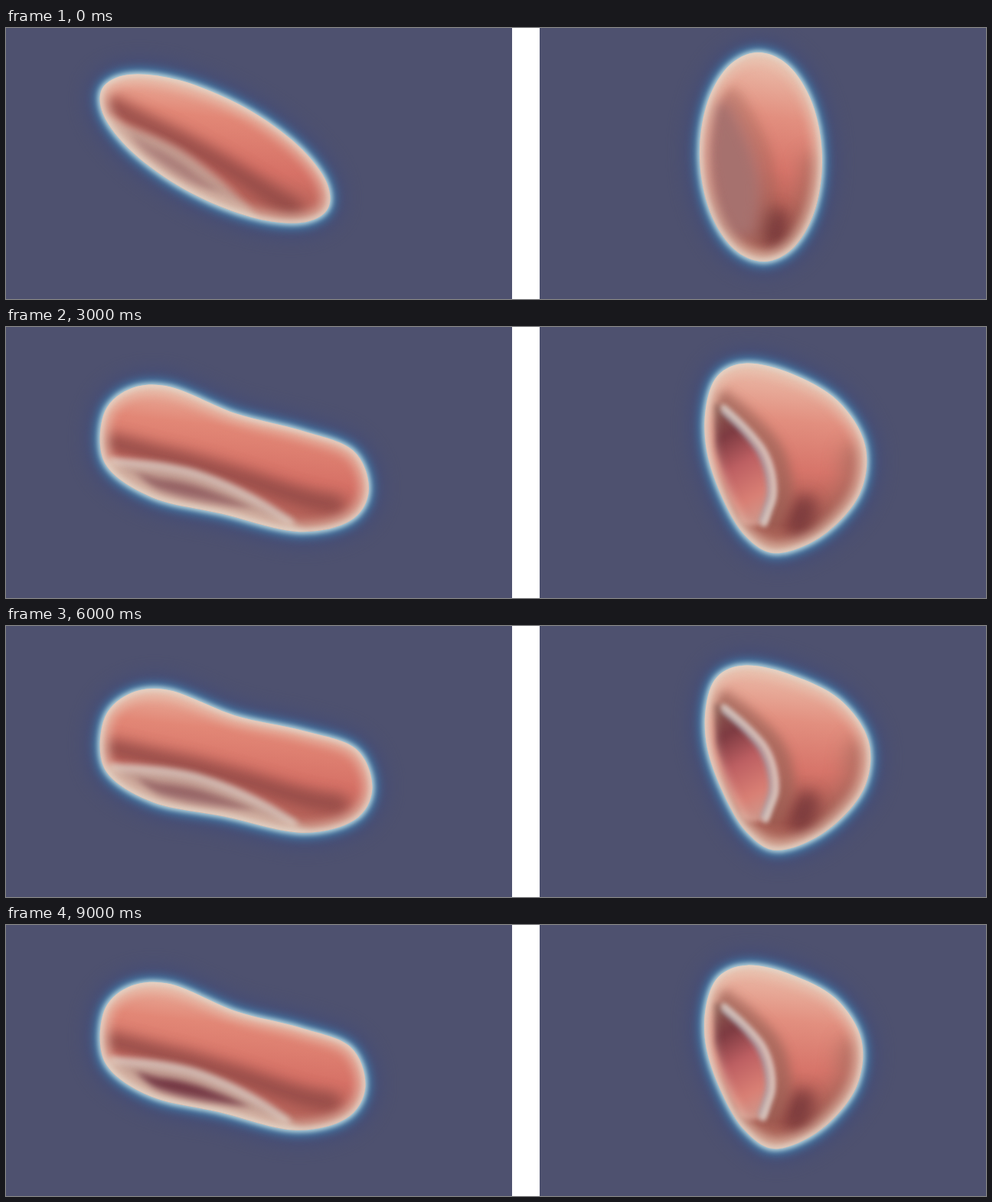
An HTML page for the animation above (10 s loop, 1280 by 355 pixels).

```html
<!DOCTYPE html>
<html lang="en">
<head>
<meta charset="utf-8">
<title>Deforming cell, two views</title>
<style>
  html, body { margin: 0; width: 100%; height: 100%; overflow: hidden; background: #fff; }
  svg { display: block; width: 100vw; height: 100vh; }
</style>
</head>
<body>
<svg id="stage" viewBox="0 0 1280 355">
  <defs id="defs">
    <linearGradient id="leftSkin" x1=".6" y1="0" x2=".4" y2="1">
      <stop offset="0" stop-color="#ecbfac"/><stop offset=".3" stop-color="#e28776"/>
      <stop offset=".6" stop-color="#d67166"/><stop offset="1" stop-color="#a65d54"/>
    </linearGradient>
    <linearGradient id="rightSkin" x1=".55" y1="0" x2=".45" y2="1">
      <stop offset="0" stop-color="#ecc3b0"/><stop offset=".3" stop-color="#e28f7f"/>
      <stop offset=".55" stop-color="#d7756a"/><stop offset=".85" stop-color="#a5574e"/>
      <stop offset="1" stop-color="#bd8272"/>
    </linearGradient>
    <linearGradient id="hollow" x1=".3" y1="0" x2=".6" y2="1">
      <stop offset="0" stop-color="#8d5850"/><stop offset=".22" stop-color="#7d3a41"/>
      <stop offset=".5" stop-color="#bd5f62"/><stop offset=".8" stop-color="#d97f74"/>
      <stop offset="1" stop-color="#cf968a"/>
    </linearGradient>
  </defs>
  <rect width="661" height="355" fill="#4e516f"/>
  <rect x="697" width="583" height="355" fill="#4e516f"/>
</svg>
<script>
const STEP = 1000, FRAMES = 10, SIDES = 12;
const stage = document.getElementById('stage');
const defs = document.getElementById('defs');

function add(parent, tag, attrs = {}) {
  const el = document.createElementNS('http://www.w3.org/2000/svg', tag);
  for (const k in attrs) el.setAttribute(k, attrs[k]);
  parent.appendChild(el);
  return el;
}

function blur(size) {
  const id = 'blur' + String(size).replace('.', '_');
  if (!document.getElementById(id)) {
    const f = add(defs, 'filter', {
      id, filterUnits: 'userSpaceOnUse', x: 0, y: 0, width: 1280, height: 355,
      'color-interpolation-filters': 'sRGB'
    });
    add(f, 'feGaussianBlur', { stdDeviation: size });
  }
  return `url(#${id})`;
}

const mix = (a, b, k) => a + (b - a) * k;
const mixPoint = (p, q, k) => p.map((v, j) => mix(v, q[j], k));
const parse = s => s.split(' ').map(p => p.split(',').map(Number));

// Points clockwise from the tip at the start of the long axis
function ellipse(cx, cy, a, b, deg) {
  const c = Math.cos(deg * Math.PI / 180), s = Math.sin(deg * Math.PI / 180);
  return Array.from({ length: SIDES }, (_, i) => {
    const t = i * 2 * Math.PI / SIDES;
    const along = -a * Math.cos(t), across = b * Math.sin(t);
    return [cx + along * c + across * s, cy + along * s - across * c];
  });
}

// Catmull-Rom spline as cubic Beziers
function spline(pts, closed) {
  const n = pts.length;
  const at = i => closed ? pts[(i + n) % n] : pts[Math.max(0, Math.min(n - 1, i))];
  let d = 'M' + pts[0];
  for (let i = 0; i < (closed ? n : n - 1); i++) {
    const [a, b, c, e] = [at(i - 1), at(i), at(i + 1), at(i + 2)];
    const c1 = b.map((v, j) => v + (c[j] - a[j]) / 6);
    const c2 = c.map((v, j) => v - (e[j] - b[j]) / 6);
    d += `C${c1} ${c2} ${c}`;
  }
  return d + (closed ? 'Z' : '');
}

// Surface point: s runs along the axis (0 to 6), v across it (0 to 1)
function surface(body, s, v) {
  const i = Math.floor(s), k = s - i;
  const near = mixPoint(body[i], body[i + 1], k);
  const far = mixPoint(body[(SIDES - i) % SIDES], body[SIDES - i - 1], k);
  return mixPoint(near, far, v);
}

// Line on the surface, with v given as a function of s
function span(body, s0, s1, v, steps = 8) {
  return Array.from({ length: steps + 1 }, (_, i) => {
    const s = mix(s0, s1, i / steps);
    return surface(body, s, v(s));
  });
}

const band = (body, s0, s1, top, bottom) =>
  spline([...span(body, s0, s1, top), ...span(body, s1, s0, bottom)], true);

const LEFT = {
  start: ellipse(273, 158, 167, 66, 28),
  rest: parse('127,118 160,83 215,79 300,114 385,135 452,160 472,212 447,254 378,269 280,246 190,226 130,183'),
  turn: 1, sway: 7
};
const RIGHT = {
  start: ellipse(986, 169, 137, 80, 88),
  rest: parse('968,53 1025,65 1085,96 1120,150 1113,213 1066,268 1006,293 965,268 935,218 915,160 914,108 930,68'),
  turn: .45, sway: 0
};

// Step response of a damped spring: overshoots near n = 4, then settles
function spring(n, damp = .33, freq = .7) {
  return 1 - Math.exp(-damp * n) * (Math.cos(freq * n) + damp / freq * Math.sin(freq * n));
}

// The stretch springs, the turn settles, the first lobe sways slowly
function bodyAt(cell, n) {
  const stretch = spring(n), turn = 1 - Math.exp(-cell.turn * n);
  const sway = cell.sway * turn * Math.sin((n - 3) * .57);
  return cell.start.map(([x, y], i) => {
    const lobe = (1 + Math.cos(i * 2 * Math.PI / SIDES)) / 2;
    return [
      mix(x, cell.rest[i][0], stretch),
      mix(y, cell.rest[i][1], turn) + sway * lobe
    ];
  });
}

const fillOf = (parent, fill, size, opacity = 1) =>
  add(parent, 'path', { fill, opacity, filter: blur(size) });
const strokeOf = (parent, stroke, width, size, opacity = 1) =>
  add(parent, 'path', {
    fill: 'none', stroke, 'stroke-width': width, 'stroke-linecap': 'round',
    'stroke-linejoin': 'round', opacity, filter: blur(size)
  });

// Halo, clipped skin and a pale rim around the given details
function makeCell(name, details) {
  const outline = [];
  for (const [color, width, size, opacity] of [
    ['#3f4a7b', 34, 13, .8], ['#4682ad', 16, 6, .95], ['#c3d8dc', 5, 3, 1]
  ]) {
    const halo = fillOf(stage, color, size, opacity);
    halo.setAttribute('stroke', color);
    halo.setAttribute('stroke-width', width);
    outline.push(halo);
  }
  const clip = add(defs, 'clipPath', { id: name + 'Clip' });
  outline.push(add(clip, 'path'));
  const g = add(stage, 'g', { 'clip-path': `url(#${name}Clip)` });
  outline.push(add(g, 'path', { fill: `url(#${name}Skin)` }));
  const parts = details(g);
  outline.push(strokeOf(g, '#e6c8b6', 22, 7, .75), strokeOf(g, '#e2dcd2', 6, 3, .75));
  parts.setBody = pts => outline.forEach(p => p.setAttribute('d', spline(pts, true)));
  return parts;
}

const left = makeCell('left', g => ({
  crease: strokeOf(g, '#8d4744', 26, 9, .85),
  under: fillOf(g, '#c0a095', 5, .9),
  dent: fillOf(g, '#6e303e', 4),
  lip: strokeOf(g, '#d8ccc4', 10, 4)
}));

const right = makeCell('right', g => ({
  shade: strokeOf(g, '#a0685c', 34, 12, .6),
  spot: strokeOf(g, '#74373a', 34, 10, .85),
  groove: strokeOf(g, '#9a6257', 26, 7),
  dish: fillOf(g, '#a6716e', 9),
  hole: fillOf(g, 'url(#hollow)', 3),
  lipShade: strokeOf(g, '#a59fa8', 8, 3),
  lip: strokeOf(g, '#dccdc5', 8, 3)
}));

function setPath(el, d, opacity) {
  el.setAttribute('d', d);
  if (opacity !== undefined) el.setAttribute('opacity', opacity);
}

function drawLeft(n) {
  const body = bodyAt(LEFT, n), open = Math.min(n, 1);
  const lip = s => .69 + .12 * (s - 2.5) ** 2;
  const dent = side => s => .88 + side * .08 * Math.sin(Math.PI * (s - 1.6) / 1.8);
  const depth = open ? .5 + .45 * Math.cos(Math.PI * (n - 1) / 8) ** 8 : .28;
  left.setBody(body);
  setPath(left.crease, spline(span(body, 1, 4.7, s => .6 + .04 * (s - 2.7) ** 2)));
  setPath(left.under, band(body, 1, 4.1, lip, () => 1.1));
  setPath(left.dent, band(body, 1.6, 3.4, dent(-1), dent(1)), depth);
  setPath(left.lip, spline(span(body, 1.1, 3.9, lip)), .1 + .75 * open);
}

function drawRight(n) {
  const body = bodyAt(RIGHT, n), open = Math.min(n, 1);
  const crest = .61 - .1 * Math.max(0, 1 - spring(n));
  const lip = offset => s => crest + offset + .1 * (s - 3.6) ** 2;
  const hole = band(body, 1.9, 4.7, lip(0), () => .95);
  right.setBody(body);
  setPath(right.shade, spline(span(body, 3.2, 4.8, () => .06)));
  setPath(right.spot, spline(span(body, 4.3, 4.7, () => .37)));
  setPath(right.groove, spline(span(body, 1.8, 4.6, lip(-.06))), .35 + .35 * open);
  setPath(right.dish, hole, 1 - open);
  setPath(right.hole, hole, open);
  setPath(right.lipShade, spline(span(body, 2.1, 4.6, lip(.03))), .8 * open);
  setPath(right.lip, spline(span(body, 2, 4.7, lip(0))), .9 * open);
}

let shown = -1;
const start = performance.now();
function tick() {
  const n = Math.floor((performance.now() - start) / STEP) % FRAMES;
  if (n !== shown) {
    shown = n;
    drawLeft(n);
    drawRight(n);
  }
  requestAnimationFrame(tick);
}
tick();
</script>
</body>
</html>
```
